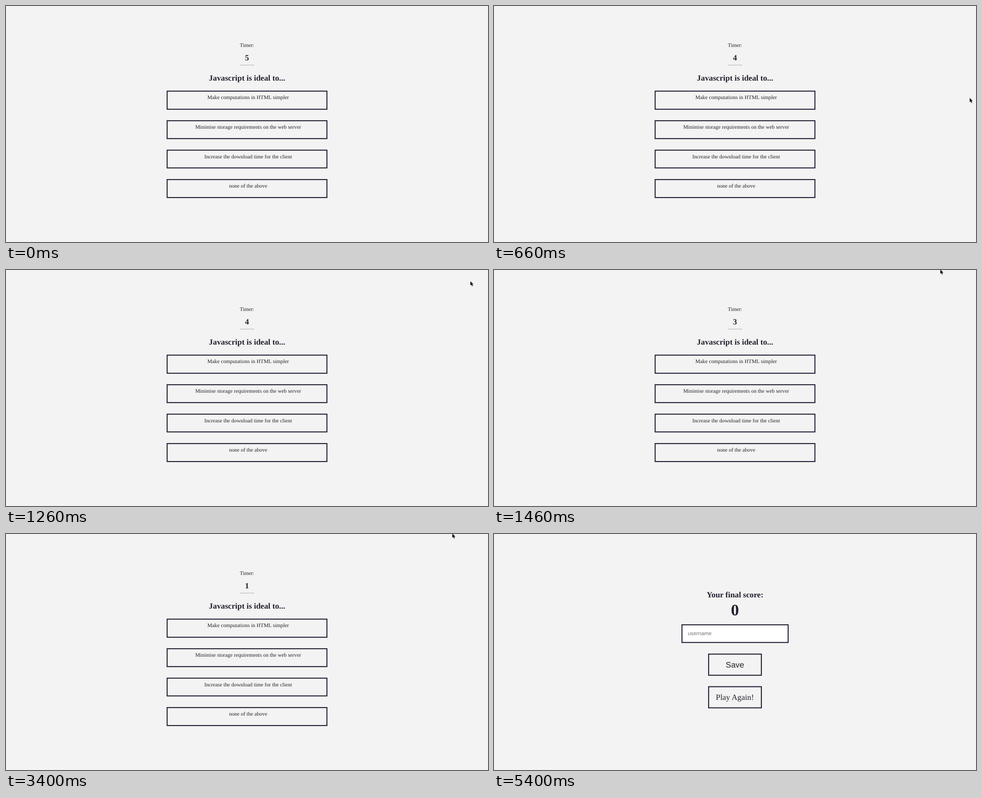
These frames come from a looping animation (1067 by 525 pixels, 6.6 s). An HTML page:

```html
<!DOCTYPE html>
<html lang="en">
<head>
<meta charset="utf-8">
<title>Quiz timer</title>
<style>
  html, body { margin: 0; width: 100%; height: 100%; overflow: hidden; background: #f3f3f3; }
  #stage { display: block; width: 1067px; height: 525px; }
  text {
    font: 11.855px "Liberation Serif", "Times New Roman", serif;
    fill: #22222c;
    text-anchor: middle;
    text-rendering: geometricPrecision;
  }
  .large { font-size: 17.78px; }
  .bold { font-size: 17.78px; font-weight: bold; fill: #20202f; }
  .score { font-size: 35.56px; }
  .sans { font-family: "Liberation Sans", Arial, sans-serif; }
  .hint { fill: #757575; text-anchor: start; }
  .frame { fill: none; stroke: #201f33; stroke-width: 2.2; }
  .field { fill: #fff; }

  #quiz, #result, #digits, #cursor { animation: 6.6s step-end infinite; }
  #quiz { animation-name: leave; }
  #result { animation-name: enter; }
  #digits { animation-name: countdown; }
  #cursor { animation-name: wander; }

  @keyframes leave {
    0% { visibility: visible; }
    81.81%, 100% { visibility: hidden; }
  }
  @keyframes enter {
    0% { visibility: hidden; }
    81.81%, 100% { visibility: visible; }
  }
  /* Digits sit 40px apart in a clipped column. */
  @keyframes countdown {
    0% { transform: translateY(0); }
    6.05% { transform: translateY(-40px); }
    21.2% { transform: translateY(-80px); }
    36.35% { transform: translateY(-120px); }
    51.5% { transform: translateY(-160px); }
    65.6%, 100% { transform: translateY(-200px); }
  }
  @keyframes wander {
    0% { transform: translate(1080px, 205px); }
    6.96% { transform: translate(1053px, 204.5px); }
    11.05% { transform: translate(1058px, 168px); }
    13.02% { transform: translate(1059px, 110px); }
    14.08% { transform: translate(1052px, 74px); }
    16.05% { transform: translate(1042px, 46px); }
    18.17% { transform: translate(1037px, 37px); }
    19.08% { transform: translate(1028px, 25px); }
    20.14% { transform: translate(1015px, 12px); }
    21.2% { transform: translate(1000px, 3px); }
    22.11% { transform: translate(988px, -1px); }
    52.41%, 100% { transform: translate(1080px, -20px); }
  }
</style>
</head>
<body>
<svg id="stage" viewBox="0 0 1067 525">
  <g id="quiz">
    <text x="533.5" y="91">Timer:</text>
    <svg x="518" y="100" width="31" height="28" overflow="hidden">
      <g id="digits">
        <text class="bold" x="15.4" y="21">5</text>
        <text class="bold" x="15.4" y="61">4</text>
        <text class="bold" x="15.4" y="101">3</text>
        <text class="bold" x="15.4" y="141">2</text>
        <text class="bold" x="15.4" y="181">1</text>
        <text class="bold" x="15.4" y="221">0</text>
      </g>
    </svg>
    <path d="M517.7 131.5h31.3" stroke="#b4b4b4" stroke-width="1.2"/>
    <text class="bold" x="533.5" y="166.3">Javascript is ideal to...</text>

    <rect class="frame" x="356.7" y="189.4" width="353.7" height="40.3"/>
    <text x="536" y="207">Make computations in HTML simpler</text>
    <rect class="frame" x="356.7" y="255.2" width="353.7" height="39.8"/>
    <text x="536" y="273">Minimise storage requirements on the web server</text>
    <rect class="frame" x="356.7" y="320.7" width="353.7" height="39.5"/>
    <text x="536" y="338.5">Increase the download time for the client</text>
    <rect class="frame" x="356.7" y="386.1" width="353.7" height="40"/>
    <text x="536" y="404.3">none of the above</text>
  </g>

  <g id="result">
    <text class="bold" x="533.5" y="141">Your final score:</text>
    <text class="bold score" x="533.5" y="181">0</text>
    <rect class="frame field" x="416.1" y="202" width="235" height="39.3"/>
    <text class="sans hint" x="429" y="225.4">username</text>
    <rect class="frame" x="475.1" y="267.2" width="116.8" height="47"/>
    <text class="large sans" x="533.3" y="296.6">Save</text>
    <rect class="frame" x="475.1" y="339.7" width="116.8" height="47"/>
    <text class="large" x="533.2" y="368.7">Play Again!</text>
  </g>

  <path id="cursor" d="M0 0V9.6L2.2 7.6L3.8 11.2L5.5 10.5L3.9 7H7Z" fill="#111" stroke="#fff" stroke-width=".8" paint-order="stroke"/>
</svg>
</body>
</html>
```
